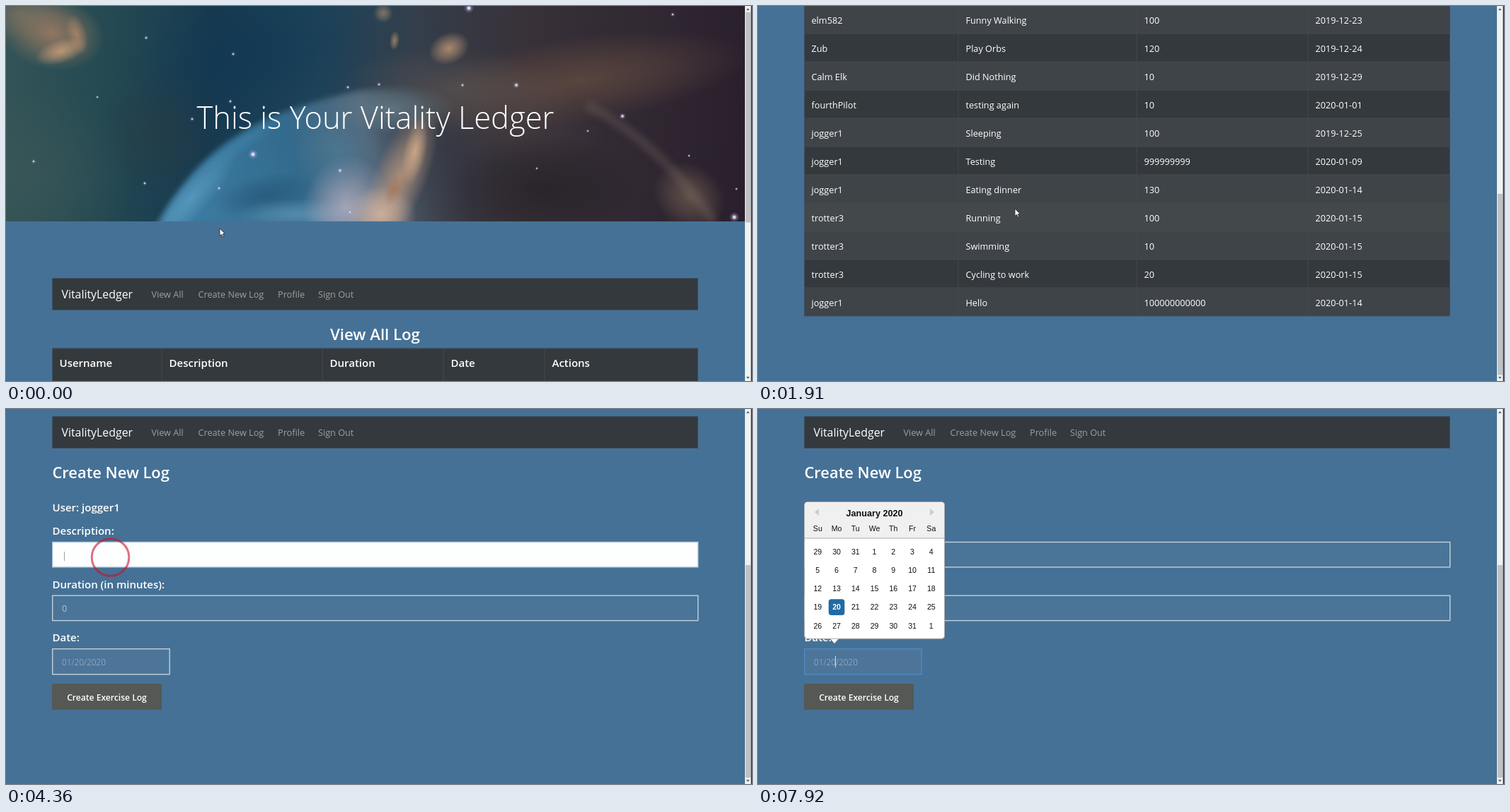
An HTML page with a canvas for the animation above (8 s loop, 1054 px wide and 531 px high).

```html
<!DOCTYPE html>
<html lang="en">
<head>
<meta charset="utf-8">
<title>Exercise log</title>
<style>
  html, body { margin: 0; width: 100%; height: 100%; overflow: hidden; background: #467196; }
  #stage { position: relative; width: 100%; height: 100%; overflow: hidden; contain: strict; }
  #page, #overlay { position: absolute; left: 0; top: 0; }
  #overlay { width: 100%; height: 100%; }
  #page { width: 1044px; height: 1064px; }
  #page canvas, #page svg { position: absolute; left: 0; top: 0; }
  svg { display: block; font-family: "Open Sans", "Noto Sans", sans-serif; }
  .arial { font-family: "Liberation Sans", Arial, sans-serif; }
</style>
</head>
<body>
<div id="stage">
  <div id="page">
    <canvas id="hero" width="1044" height="305"></canvas>
    <svg id="content" width="1044" height="1064"></svg>
  </div>
  <svg id="overlay"></svg>
</div>
<script>
const LOOP = 8000;
const $ = id => document.getElementById(id);

// ---------- hero picture ----------
function paintHero() {
  const ctx = $('hero').getContext('2d');
  const base = ctx.createLinearGradient(0, 60, 1044, 150);
  [[0, '#335457'], [.13, '#254a52'], [.28, '#163a50'], [.42, '#1f445a'],
   [.55, '#343e4a'], [.7, '#383138'], [1, '#2a202d']]
    .forEach(([at, color]) => base.addColorStop(at, color));
  ctx.fillStyle = base;
  ctx.fillRect(0, 0, 1044, 306);

  const blob = (x, y, rx, ry, turn, rgb, alpha) => {
    ctx.save();
    ctx.translate(x, y);
    ctx.rotate(turn);
    ctx.scale(rx, ry);
    const g = ctx.createRadialGradient(0, 0, 0, 0, 0, 1);
    g.addColorStop(0, `rgba(${rgb},${alpha})`);
    g.addColorStop(.5, `rgba(${rgb},${alpha * .55})`);
    g.addColorStop(1, `rgba(${rgb},0)`);
    ctx.fillStyle = g;
    ctx.fillRect(-1, -1, 2, 2);
    ctx.restore();
  };

  blob(350, 70, 180, 110, -.3, '14,54,84', .5);
  blob(30, 240, 150, 130, 0, '66,90,88', .5);
  blob(220, 180, 90, 90, .4, '46,54,60', .4);
  blob(810, 105, 240, 62, -.15, '104,78,66', .7);
  blob(640, 120, 160, 60, .1, '98,88,84', .55);
  blob(720, 170, 130, 60, .1, '74,64,66', .5);

  // blue bubble
  ctx.save();
  ctx.filter = 'blur(4px)';
  const bubble = ctx.createLinearGradient(220, 300, 640, 190);
  bubble.addColorStop(0, 'rgba(72,142,184,.85)');
  bubble.addColorStop(.45, 'rgba(56,118,156,.8)');
  bubble.addColorStop(.72, 'rgba(98,118,138,.7)');
  bubble.addColorStop(1, 'rgba(60,56,66,0)');
  ctx.fillStyle = bubble;
  ctx.beginPath();
  ctx.moveTo(214, 312);
  ctx.bezierCurveTo(262, 212, 350, 150, 500, 120);
  ctx.bezierCurveTo(610, 112, 650, 160, 660, 312);
  ctx.fill();
  ctx.lineWidth = 14;
  ctx.strokeStyle = 'rgba(110,98,92,.35)';
  ctx.beginPath();
  ctx.moveTo(820, 140);
  ctx.quadraticCurveTo(920, 190, 1000, 306);
  ctx.stroke();
  ctx.restore();

  blob(365, 268, 75, 30, -.2, '34,80,112', .6);
  blob(262, 272, 95, 24, -.85, '104,170,206', .55);
  blob(330, 195, 90, 16, -.6, '70,138,178', .4);
  blob(415, 295, 90, 22, 0, '120,168,196', .5);
  blob(480, 285, 60, 75, .2, '186,178,196', .8);
  blob(470, 205, 60, 60, 0, '88,136,162', .4);
  blob(545, 145, 90, 36, 0, '112,138,148', .6);
  blob(760, 260, 140, 80, 0, '34,30,36', .6);
  blob(965, 270, 55, 45, .7, '128,108,90', .6);

  // orange clouds
  blob(556, 245, 38, 110, .4, '206,162,130', .75);
  blob(530, 295, 50, 40, 0, '220,184,160', .8);
  blob(578, 205, 16, 48, .2, '230,186,146', .7);
  blob(548, 260, 12, 24, .4, '164,112,80', .6);
  blob(65, 38, 75, 52, .2, '170,128,100', .8);
  blob(78, 64, 38, 17, -.3, '224,172,126', .7);
  blob(100, 40, 14, 30, -.3, '212,150,108', .55);
  blob(20, 12, 75, 36, .2, '138,118,98', .6);
  blob(626, 60, 30, 22, -.4, '206,162,126', .75);
  blob(549, 49, 7, 14, .1, '190,150,110', .7);
  blob(533, 10, 14, 14, 0, '182,150,120', .6);

  const stars = [[654, 3, 9], [1029, 299, 9], [349, 210, 9], [721, 112, 6], [871, 156, 6],
    [321, 68, 4], [198, 45, 4], [39, 220, 4], [472, 233, 5], [527, 111, 4], [483, 115, 4],
    [645, 112, 4], [942, 12, 4], [301, 258, 4], [196, 251, 4], [317, 135, 4], [1032, 259, 3],
    [965, 212, 3], [263, 160, 4], [750, 230, 3], [822, 177, 3], [486, 292, 4], [129, 129, 3]];
  stars.forEach(([x, y, r]) => {
    blob(x, y, r * .8, r * .8, 0, '170,165,225', .7);
    blob(x, y, r * .4, r * .4, 0, '255,255,255', 1);
  });
}

// ---------- drawing helpers ----------
const text = (x, y, size, str, { fill = '#fff', weight = 400, anchor = 'start', cls = '' } = {}) =>
  `<text x="${x}" y="${y + size * .36}" font-size="${size}" font-weight="${weight}"
    fill="${fill}" text-anchor="${anchor}" class="${cls}">${str}</text>`;
const rect = (x, y, w, h, fill, extra = '') =>
  `<rect x="${x}" y="${y}" width="${w}" height="${h}" fill="${fill}" ${extra}/>`;
const path = (d, fill, extra = '') => `<path d="${d}" fill="${fill}" ${extra}/>`;
const bold = { weight: 600 };
const softEdge = 'stroke="#3f5264"';

function navbar(active) {
  const links = [[205.5, 'View All'], [271.5, 'Create New Log'], [384, 'Profile'], [441, 'Sign Out']];
  return text(522, 158, 43.5, 'This is Your Vitality Ledger', { weight: 300, anchor: 'middle' })
    + rect(65.5, 385.5, 912, 45, '#34393d', softEdge)
    + text(78.5, 408, 15.9, 'VitalityLedger')
    + links.map(([x, name]) =>
        text(x, 408.5, 12.7, name, { fill: name === active ? '#d6d8d9' : '#9da0a2' })).join('');
}

const rows = [
  ['elm582', 'Funny Walking', 100, '2019-12-23'],
  ['Zub', 'Play Orbs', 120, '2019-12-24'],
  ['Calm Elk', 'Did Nothing', 10, '2019-12-29'],
  ['fourthPilot', 'testing again', 10, '2020-01-01'],
  ['jogger1', 'Sleeping', 100, '2019-12-25'],
  ['jogger1', 'Testing', 999999999, '2020-01-09'],
  ['jogger1', 'Eating dinner', 130, '2020-01-14'],
  ['trotter3', 'Running', 100, '2020-01-15'],
  ['trotter3', 'Swimming', 10, '2020-01-15'],
  ['trotter3', 'Cycling to work', 20, '2020-01-15'],
  ['jogger1', 'Hello', 100000000000, '2020-01-14']
];

function table(title, columns, names, body, hover) {
  const bottom = 532 + 40 * body.length;
  let out = text(521.5, 465, 22.2, title, { weight: 600, anchor: 'middle' })
    + rect(65, 484.5, 913, bottom - 484.5, '#34393d');
  body.forEach((cells, i) => {
    const y = 532 + 40 * i;
    const fill = i === hover ? '#43484b' : i % 2 ? '#34393d' : '#3f4449';
    out += rect(65, y, 913, 40, fill) + rect(65, y - .5, 913, 1, '#444a4f')
      + cells.map((cell, c) => text(columns[c] + 10.5, y + 21, 12.7, cell)).join('');
  });
  out += columns.slice(1).map(x => rect(x - .5, 485, 1, bottom - 485, '#42484d')).join('');
  out += names.map((name, c) => text(columns[c] + 10.5, 506, 15, name, bold)).join('');
  return out + rect(65.5, 485, 912, bottom - 485, 'none', softEdge);
}

function field(y, width, value, focused, selected) {
  const box = rect(65.7, y, width, 35.4, focused ? '#fdfffe' : 'rgba(255,255,255,.02)',
    `stroke="${focused ? '#b3c9dc' : '#c3d0da'}" stroke-width="1.4"`);
  if (selected) return box + rect(79, y + 8.5, 7.5, 18, '#3292f5') + text(79, y + 18.5, 12.6, value);
  const caret = focused ? '<tspan font-weight="300" fill="#555">|</tspan>' : '';
  return box + text(79, y + 18.5, 12.6, value + caret, { fill: focused ? '#495057' : '#b4c5d3' });
}

function calendar() {
  const days = ['Su', 'Mo', 'Tu', 'We', 'Th', 'Fr', 'Sa'];
  const arial = { cls: 'arial', anchor: 'middle', fill: '#111' };
  const column = c => 84.3 + 26.75 * c;
  let out = path('M101 699l7 8 7-8z', '#fff')
    + rect(65.7, 506.7, 197.8, 193.5, '#fff', 'rx="4" stroke="#aeaeae"')
    + path('M66 558v-47q0-4 4-4h189q4 0 4 4v47z', '#f0f0f0')
    + rect(66, 557.5, 197.5, 1, '#aeaeae')
    + path('M86 516v10l-6-5zM243 516v10l6-5z', '#ccc')
    + text(164.5, 522.5, 12.6, 'January 2020', { ...arial, weight: 700 })
    + days.map((d, c) => text(column(c), 544, 10.6, d, arial)).join('');
  for (let i = 0; i < 35; i++) {
    const x = column(i % 7), y = 577 + 26.2 * Math.floor(i / 7);
    const day = (i + 28) % 31 + 1, chosen = i === 22;
    if (chosen) out += rect(x - 11.3, y - 11.3, 22.6, 22.6, '#216ba5', 'rx="4"');
    out += text(x, y, 10.6, day, chosen ? { ...arial, fill: '#fff', weight: 700 } : arial);
  }
  return out;
}

function form(t) {
  const onDescription = t >= 4200 && t < 6190;
  const onDuration = t >= 6190 && t < 7700;
  const onDate = t >= 7900;
  const typed = t < 5030 ? 0 : 1 + Math.floor((t - 5030) / 166 + .01);
  const duration = t < 6760 ? '0' : t < 6990 ? '1' : '10';
  return text(65.5, 465, 21.9, 'Create New Log', bold)
    + text(65.5, 515, 15, 'User: jogger1', bold)
    + text(65.5, 548, 15, 'Description:', bold)
    + field(563.5, 912, 'Hello'.slice(0, typed), onDescription)
    + text(65.5, 623.5, 15, 'Duration (in minutes):', bold)
    + field(639.2, 912, duration, onDuration, onDuration && t < 6760)
    + text(65.5, 699, 15, 'Date:', bold)
    + rect(65.7, 714.7, 165.5, 36, 'rgba(255,255,255,.03)',
        `stroke="${onDate ? '#5287c4' : '#c3d0da'}" stroke-width="1.4"`)
    + text(79, 733.5, 11.8, '01/20/2020', { fill: '#a9bccb', weight: 300 })
    + rect(65, 764, 155, 37, '#555855')
    + text(142.5, 783.5, 12.1, 'Create Exercise Log', { weight: 600, anchor: 'middle' })
    + (onDate ? calendar() : '');
}

// ---------- timing ----------
// Bursts of screen updates: first time, last time, number of updates.
const bursts = [[100, 1050, 8], [1170, 2190, 8], [2350, 3350, 8], [3500, 4500, 8], [4650, 4650, 1],
  [5030, 5860, 6], [6190, 6340, 2], [6760, 7000, 2], [7480, 7920, 4]];

function lastUpdate(t) {
  const burst = bursts.filter(b => b[0] <= t).pop();
  if (!burst) return 0;
  const [from, to, count] = burst;
  if (count === 1) return from;
  const step = (to - from) / (count - 1);
  return from + step * Math.min(count - 1, Math.floor((t - from) / step + .12));
}

// time, pointer x, pointer y, scroll
const track = [[0, 302, 315, 0], [500, 228, 404, 0], [770, 230, 400, 0], [1050, 330, 315, 240],
  [1170, 363, 287, 533], [2350, 363, 287, 533], [2778, 345, 318, 360], [3070, 345, 330, 0],
  [3350, 318, 404, 0], [3500, 322, 395, 0], [3643, 336, 349, 0], [3785, 300, 320, 0],
  [4070, 190, 240, 375], [4214, 145, 209, 375], [7300, 145, 209, 375], [7627, 109, 350, 375],
  [LOOP, 109, 350, 375]];

function pose(t) {
  const next = Math.max(1, track.findIndex(k => k[0] > t));
  const a = track[next - 1], b = track[next];
  const mix = (t - a[0]) / (b[0] - a[0]);
  return a.slice(1).map((v, i) => Math.round(v + (b[i + 1] - v) * mix));
}

function pointer(t, x, y) {
  const ring = (cx, cy) =>
    `<circle cx="${cx}" cy="${cy}" r="26.3" fill="none" stroke="#c8102e" stroke-opacity=".6" stroke-width="3"/>`;
  if (t > 4200 && t < 4490) return ring(147.5, 210);
  if (t > 7700 && t < 7900) return ring(109, 358);
  if (t >= 7900) return rect(109, 350, 1, 16, '#d5dfe7');
  return path(`M${x} ${y}v10.5l2.5-2.2 1.7 3.7 1.6-.8-1.6-3.5h3.2z`, '#fff', 'stroke="#222" stroke-width=".8"');
}

function scrollbar(scroll, height) {
  const scale = 514 / height;
  return rect(1044, 0, 10, 531, '#f0f1f1')
    + rect(1045, 8.5 + scroll * scale, 7, 531 * scale, '#bfc1c2')
    + path('M1045.8 6l2.4-3 2.4 3zM1045.8 525l2.4 3 2.4-3z', '#666')
    + rect(1052.6, 0, 1.4, 531, '#2a2f33');
}

function draw(t) {
  const [x, y, scroll] = pose(t);
  let height, content;
  if (t < 600) {
    height = 916;
    content = navbar('') + table('View All Log', [65, 220, 447, 618, 761],
      ['Username', 'Description', 'Duration', 'Date', 'Actions'], [], -1);
  } else if (t < 3400) {
    height = 1064;
    const hover = t < 1170 ? -1 : t < 2600 ? 7 : 5;
    content = navbar('View All') + table('View All Logs', [65, 283, 535, 777],
      ['Username', 'Description', 'Duration', 'Date'], rows, hover);
  } else {
    height = 907;
    content = navbar(t < 4200 ? 'Create New Log' : '') + form(t);
  }
  $('content').innerHTML = content;
  $('page').style.transform = `translateY(${-scroll}px)`;
  $('overlay').innerHTML = scrollbar(scroll, height) + pointer(t, x, y);
}

let shown = -1;
const start = performance.now();
function frame() {
  const t = lastUpdate((performance.now() - start) % LOOP);
  if (t !== shown) draw(shown = t);
  requestAnimationFrame(frame);
}
paintHero();
frame();
</script>
</body>
</html>
```
